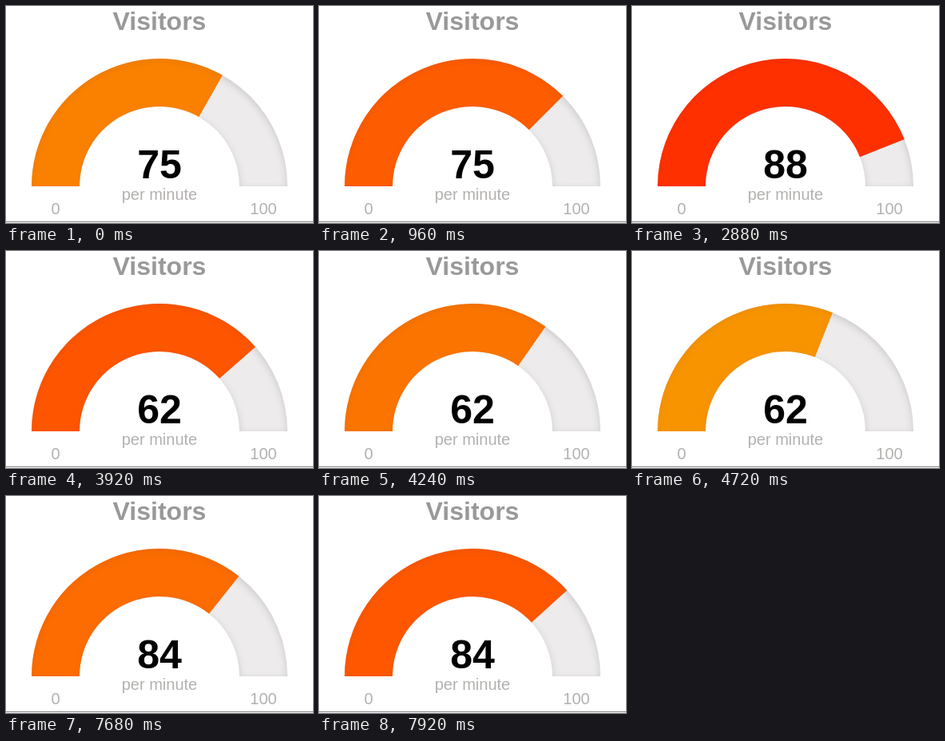
An HTML page for the animation above (8000 ms loop, 384 px wide and 272 px high).

```html
<!DOCTYPE html>
<html lang="en">
<head>
<meta charset="utf-8">
<title>Visitors gauge</title>
<style>
  html, body { margin: 0; width: 100%; height: 100%; overflow: hidden; background: #fff; }
  svg { display: block; width: 384px; height: 272px; }
  text { font-family: Arial, "Liberation Sans", sans-serif; font-size: 20px; text-anchor: middle; fill: #b3b1af; }
  .title { font-size: 32px; font-weight: bold; fill: #999; }
  .value { font-size: 50px; font-weight: bold; fill: #010101; }
</style>
</head>
<body>
<svg viewBox="0 0 384 272">
  <defs>
    <filter id="shade" color-interpolation-filters="sRGB">
      <feOffset dy="3"/>
      <feGaussianBlur stdDeviation="5" result="blur"/>
      <feComposite operator="out" in="SourceGraphic" in2="blur" result="inverse"/>
      <feFlood flood-color="#000" flood-opacity=".15"/>
      <feComposite operator="in" in2="inverse"/>
      <feComposite operator="over" in2="SourceGraphic"/>
    </filter>
    <filter id="faint" color-interpolation-filters="sRGB">
      <feOffset dy="3"/>
      <feGaussianBlur stdDeviation="5" result="blur"/>
      <feComposite operator="out" in="SourceGraphic" in2="blur" result="inverse"/>
      <feFlood flood-color="#000" flood-opacity=".05"/>
      <feComposite operator="in" in2="inverse"/>
      <feComposite operator="over" in2="SourceGraphic"/>
    </filter>
  </defs>
  <path id="track" fill="#edebeb" filter="url(#shade)"/>
  <path id="level" filter="url(#faint)"/>
  <text class="title" x="192" y="30">Visitors</text>
  <text class="value" id="value" x="192" y="216">75</text>
  <text x="192" y="243">per minute</text>
  <text x="62" y="261">0</text>
  <text x="322" y="261">100</text>
  <rect y="270" width="384" height="1" fill="#808080"/>
</svg>
<script>
const LOOP = 8000, TICK = 80, EASE_TIME = 960;
const CX = 192, CY = 226, OUTER = 160, INNER = 100;

// Each refresh moves the gauge from one value to the next.
const refreshes = [
  { at: 0, from: 66.4, to: 75 },
  { at: 1920, from: 75, to: 88 },
  { at: 3760, from: 88, to: 62 },
  { at: 7520, from: 62, to: 84 }
];
const stops = [[62, 248, 148], [75, 254, 92], [88, 255, 48]];

const track = document.getElementById('track');
const level = document.getElementById('level');
const label = document.getElementById('value');

const easeOut = n => Math.pow(Math.min(n, 1), 0.48);
const mix = (a, b, k) => a + (b - a) * k;

function point(r, value) {
  const a = Math.PI * (1 - value / 100);
  return `${(CX + r * Math.cos(a)).toFixed(2)} ${(CY - r * Math.sin(a)).toFixed(2)}`;
}

function band(value) {
  return `M${point(INNER, 0)}L${point(OUTER, 0)}` +
    `A${OUTER} ${OUTER} 0 0 1 ${point(OUTER, value)}L${point(INNER, value)}` +
    `A${INNER} ${INNER} 0 0 0 ${point(INNER, 0)}Z`;
}

function color(value) {
  const [a, b] = value < 75 ? stops : stops.slice(1);
  const k = (value - a[0]) / (b[0] - a[0]);
  return `rgb(${Math.round(mix(a[1], b[1], k))},${Math.round(mix(a[2], b[2], k))},0)`;
}

function draw() {
  const now = performance.now() % LOOP;
  const t = Math.floor(now / TICK) * TICK;
  const step = refreshes.filter(r => r.at <= t).pop();
  const value = mix(step.from, step.to, easeOut((t - step.at) / EASE_TIME));
  level.setAttribute('d', band(value));
  level.setAttribute('fill', color(value));
  label.textContent = step.to;
  requestAnimationFrame(draw);
}

track.setAttribute('d', band(100));
draw();
</script>
</body>
</html>
```
